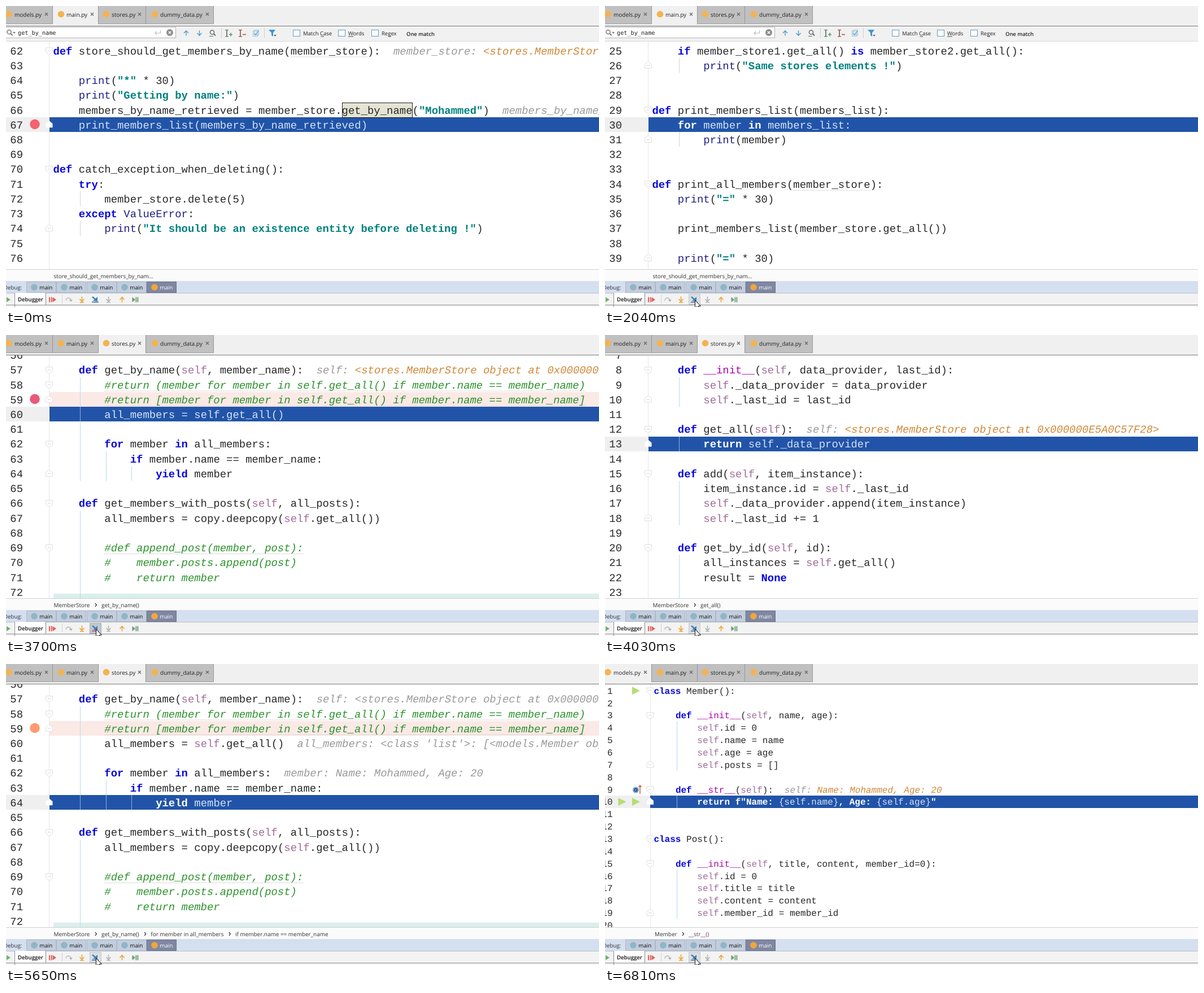
Animation, 1050 px wide and 533 px high, one loop 8000 ms. Source, as an HTML page with a canvas:

```html
<!DOCTYPE html>
<html lang="en">
<head>
<meta charset="utf-8">
<title>Debugger session</title>
<style>
html, body { margin: 0; width: 100%; height: 100%; overflow: hidden; background: #fff; }
canvas { display: block; width: 1050px; height: 533px; }
</style>
</head>
<body>
<canvas id="stage" width="1050" height="533"></canvas>
<script>
const W = 1050, H = 533, LOOP = 8000;
const ctx = document.getElementById('stage').getContext('2d');
const MONO = '"Liberation Mono", monospace', UI = '"Open Sans", sans-serif';
const BLUE = '#2154a8', INK = '#282828';

// Each view: editor geometry, first line number, source text and decorations.
const big = { cw: 11.36, rowH: 26.23, x0: 83.4, numRight: 30, foldX: 76.5, base: 19.7 };
const small = { cw: 9.62, rowH: 21.86, x0: 86.4, numRight: 13.6, foldX: 80, base: 16.4 };

const views = {
  names: { ...big, tab: 1, top: 65.9, first: 62, opens: [62, 70], closes: [67, 74],
    guides: [[4, 72, 72], [4, 74, 74]], wavy: [[62, 37, 12]], dots: [67], found: [66, 45, 11],
    src: `def store_should_get_members_by_name(member_store):

    print("*" * 30)
    print("Getting by name:")
    members_by_name_retrieved = member_store.get_by_name("Mohammed")
    print_members_list(members_by_name_retrieved)


def catch_exception_when_deleting():
    try:
        member_store.delete(5)
    except ValueError:
        print("It should be an existence entity before deleting !")

` },
  list: { ...big, tab: 1, top: 39.67, first: 24, opens: [29, 34], closes: [26, 31, 39],
    guides: [[4, 26, 26], [4, 31, 31]], wavy: [[34, 22, 12]],
    src: `          _
    if member_store1.get_all() is member_store2.get_all():
        print("Same stores elements !")


def print_members_list(members_list):
    for member in members_list:
        print(member)


def print_all_members(member_store):
    print("=" * 30)

    print_members_list(member_store.get_all())

    print("=" * 30)` },
  byName: { ...big, tab: 2, top: 22.37, first: 56, opens: [57, 58, 62, 66, 69], closes: [59, 64],
    guides: [[4, 58, 64], [4, 67, 72], [8, 63, 64], [12, 64, 64]], tint: true,
    wavy: [[58, 8, 75], [59, 8, 75], [69, 8, 31]], dots: [59], pink: 59, band: true,
    src: `
    def get_by_name(self, member_name):
        #return (member for member in self.get_all() if member.name == member_name)
        #return [member for member in self.get_all() if member.name == member_name]
        all_members = self.get_all()

        for member in all_members:
            if member.name == member_name:
                yield member

    def get_members_with_posts(self, all_posts):
        all_members = copy.deepcopy(self.get_all())

        #def append_post(member, post):
        #    member.posts.append(post)
        #    return member
` },
  getAll: { ...big, tab: 2, top: 22.37, first: 7, opens: [8, 12, 15, 20], closes: [10, 13, 18],
    guides: [[4, 9, 10], [4, 13, 13], [4, 16, 18], [4, 21, 23]], tint: true,
    src: `
    def __init__(self, data_provider, last_id):
        self._data_provider = data_provider
        self._last_id = last_id

    def get_all(self):
        return self._data_provider

    def add(self, item_instance):
        item_instance.id = self._last_id
        self._data_provider.append(item_instance)
        self._last_id += 1

    def get_by_id(self, id):
        all_instances = self.get_all()
        result = None
` },
  models: { ...small, tab: 0, top: 36.3, first: 1, opens: [1, 3, 9, 13, 15], closes: [7, 10, 19],
    guides: [[4, 4, 7], [4, 10, 10], [4, 16, 19]], tint: true,
    wavy: [[1, 12, 2], [13, 10, 2]], marks: true,
    src: `class Member():

    def __init__(self, name, age):
        self.id = 0
        self.name = name
        self.age = age
        self.posts = []

    def __str__(self):
        return f"Name: {self.name}, Age: {self.age}"


class Post():

    def __init__(self, title, content, member_id=0):
        self.id = 0
        self.title = title
        self.content = content
        self.member_id = member_id
` }
};

// Hints: text after "~" is freshly changed and shown in orange.
const OBJ = '<stores.MemberStore object at 0x000000E5A0C57F28>';
const ALL = "<class 'list'>: [<models.Member object at 0x000000E5A0C61B70>";
const GEN = '<generator object MemberStore.get_by_name at 0x000000E5A0C4>';
const PERSON = 'Name: Mohammed, Age: 20';
const START = ['store_should_get_members_by_nam...'];
const LIST = ['print_members_list()', 'for member in members_list'];
const NAME = ['MemberStore', 'get_by_name()'];
const GET = ['MemberStore', 'get_all()'];
const FOR = [...NAME, 'for member in all_members'];

// [start ms, view, current line, breadcrumbs, hints by line]
const steps = [
  [0, 'names', 67, START, { 62: 'member_store: ~' + OBJ, 66: 'members_by_name_retrieved: ' + GEN }],
  [2040, 'list', 30, START, {}],
  [2210, 'list', 30, LIST, { 29: 'members_list: ~' + GEN }],
  [3010, 'byName', 60, NAME, {}],
  [3150, 'byName', 60, NAME, { 57: 'self: ~' + OBJ }],
  [3800, 'getAll', 13, NAME, {}],
  [4030, 'getAll', 13, GET, { 12: 'self: ~' + OBJ }],
  [4400, 'byName', 62, GET, {}],
  [4650, 'byName', 62, NAME, { 57: 'self: ' + OBJ, 60: 'all_members: ~' + ALL }],
  [5030, 'byName', 63, NAME, {}],
  [5190, 'byName', 63, FOR, { 57: 'self: ' + OBJ, 60: 'all_members: ' + ALL, 62: 'member: ~' + PERSON }],
  [5480, 'byName', 64, FOR, {}],
  [5650, 'byName', 64, [...FOR, 'if member.name == member_name'],
    { 57: 'self: ' + OBJ, 60: 'all_members: ' + ALL, 62: 'member: ' + PERSON }],
  [6050, 'list', 31, LIST, {}],
  [6210, 'list', 31, LIST, { 29: 'members_list: ' + GEN, 30: 'member: ~' + PERSON }],
  [6660, 'models', 10, LIST, {}],
  [6810, 'models', 10, ['Member', '__str__()'], { 9: 'self: ~' + PERSON }]
];
const presses = [[2930, 3010], [3700, 3800], [4980, 5030], [6590, 6660]];

function rect(x, y, w, h, c) { ctx.fillStyle = c; ctx.fillRect(x, y, w, h); }
function frame(x, y, w, h, c) { ctx.strokeStyle = c; ctx.lineWidth = 1; ctx.strokeRect(x + .5, y + .5, w - 1, h - 1); }
function disc(x, y, r, c) { ctx.fillStyle = c; ctx.beginPath(); ctx.arc(x, y, r, 0, 7); ctx.fill(); }
function text(s, x, y, font, c) { ctx.font = font; ctx.fillStyle = c; ctx.fillText(s, x, y); }
function path(pts, closed) {
  ctx.beginPath();
  for (let i = 0; i < pts.length; i += 2) ctx.lineTo(pts[i], pts[i + 1]);
  if (closed) ctx.closePath();
}
function poly(pts, c) { path(pts, true); ctx.fillStyle = c; ctx.fill(); }
function line(pts, c, w = 1) { path(pts); ctx.strokeStyle = c; ctx.lineWidth = w; ctx.stroke(); }
function ui(s, x, y, size, c = '#222', weight = '') { text(s, x, y, `${weight} ${size}px ${UI}`, c); }

// Vertical arrow; dir is 1 for down, -1 for up.
function arrow(x, y, dir, c, w = 1.4) {
  line([x, y - 4.5 * dir, x, y + 4 * dir], c, w);
  line([x - 4, y, x, y + 4.3 * dir, x + 4, y], c, w);
}
function lens(x, y, c) {
  ctx.strokeStyle = c; ctx.lineWidth = 1.5;
  ctx.beginPath(); ctx.arc(x, y, 3.6, 0, 7); ctx.stroke();
  line([x + 2.6, y + 2.6, x + 6, y + 6], c, 2);
}

const TOKEN = /#.*|f?"[^"]*"|\w+|[^\w"#]+/g;
const KEYWORDS = /^(def|try|except|if|is|for|in|yield|return|class|None)$/;
function tokens(src) {
  const out = [];
  for (const m of src.matchAll(TOKEN)) {
    const s = m[0], at = m.index;
    if (s[0] === '#') out.push([s, at, 'italic', '#2c922c']);
    else if (s.includes('"')) {
      let p = at;
      for (const part of s.split(/(\{[^}]*\})/)) {
        out.push([part, p, part[0] === '{' ? '' : 'bold', '#008080']);
        p += part.length;
      }
    }
    else if (KEYWORDS.test(s)) out.push([s, at, 'bold', '#0808de']);
    else if (/^(print|ValueError)$/.test(s)) out.push([s, at, '', '#202084']);
    else if (s === 'self') out.push([s, at, '', '#a06c9a']);
    else if (/^__\w+__$/.test(s)) out.push([s, at, '', '#b200b2']);
    else if (s.trim()) out.push([s, at, '', INK]);
  }
  return out;
}
for (const v of Object.values(views)) {
  v.lines = v.src.split('\n');
  v.tokens = v.lines.map(tokens);
}

function fold(x, y, dir, active) {
  const pts = [x - 6, y - 5 * dir, x + 6, y - 5 * dir, x + 6, y + 2 * dir, x, y + 7 * dir, x - 6, y + 2 * dir];
  poly(pts, '#fff');
  if (active) return;
  path(pts, true);
  ctx.strokeStyle = '#dedede'; ctx.lineWidth = 1; ctx.stroke();
  line([x - 3, y, x + 3, y], '#d4d4d4');
}

function editor(v, current, hints, t) {
  const { cw, rowH, x0, foldX } = v, size = cw / .6;
  const clipTop = v.tab === 1 ? 62.5 : 36;
  const top = n => v.top + (n - v.first) * rowH;
  const col = c => x0 + c * cw;
  const font = style => `${style} ${size}px ${MONO}`;
  const edge = Math.round(foldX), rowPx = Math.round(rowH);
  const bar = (n, x, w, c) => rect(x, Math.round(top(n)), w, rowPx, c);
  ctx.save();
  ctx.beginPath(); ctx.rect(0, clipTop, W, 466 - clipTop); ctx.clip();
  rect(0, 0, W, 466, '#fff');
  if (v.pink) bar(v.pink, edge, W, '#fbe9e6');
  if (v.band) rect(84, 458, W, 9, '#daefec');
  rect(Math.floor(foldX), 0, 1, 466, '#e6e6e6');
  bar(current, 0, edge, '#efefef');
  bar(current, edge, W, BLUE);

  for (const [c, a, b] of v.guides) {
    const x = Math.round(col(c) + 2.4);
    rect(x, top(a), 1, (b - a + 1) * rowH, v.tint ? '#b4dcee' : '#cfd4d6');
    if (current >= a && current <= b) bar(current, x, 1, '#8fb0dc');
  }
  if (v.found) {
    const [n, c, len] = v.found;
    const box = [Math.round(col(c)), Math.round(top(n)), Math.round(len * cw), rowPx + 1];
    rect(...box, '#e4e4d4');
    frame(...box, '#222');
  }
  ctx.setLineDash([2, 1]);
  for (const [n, c, len] of v.wavy || []) {
    const y = top(n) + rowH - 2;
    line([col(c), y, col(c + len), y], '#c9cec6');
  }
  ctx.setLineDash([]);

  v.lines.forEach((src, i) => {
    const n = v.first + i, y = top(n) + v.base, lit = n === current;
    text(n, v.numRight - String(n).length * cw, y, font(''), INK);
    for (const [s, c, style, color] of v.tokens[i])
      text(s, col(c), y, font(style), lit ? (style === 'bold' ? '#fff' : '#d5e2f5') : color);
    if (hints[n]) {
      const [old, fresh = ''] = hints[n].split('~');
      const x = col(src.length + 2) + .5;
      text(old, x, y, font('italic'), '#999');
      text(fresh, x + old.length * cw, y, font('italic'), '#cf8837');
    }
  });

  const mid = n => top(n) + rowH / 2;
  for (const n of v.opens) fold(foldX, mid(n), 1, n === current);
  for (const n of v.closes) fold(foldX, mid(n), -1, n === current);
  for (const n of v.dots || [])
    disc(51, mid(n) - .8, 8.8, v.tab === 1 ? '#f5626f' : t < 3800 ? '#e85a78' : '#fd9b71');
  if (v.marks) {
    for (const [x, n] of [[48, 1], [48, 10], [23.5, 10]])
      poly([x, mid(n) - 7, x + 14, mid(n), x, mid(n) + 7], '#b5dd72');
    disc(54.5, 223, 5.5, '#6fa9d6');
    ctx.strokeStyle = '#234'; ctx.lineWidth = 1.2;
    ctx.beginPath(); ctx.arc(54.5, 223, 2.3, 0, 7); ctx.stroke();
    line([62, 230, 62, 215], '#c8573c', 1.4);
    line([59.5, 218, 62, 215, 64.5, 218], '#c8573c', 1.4);
  }
  ctx.restore();
}

function tabs(active) {
  rect(0, 0, W, 36, '#f0f0f0');
  const items = [['models.py', 0, 83, 15], ['main.py', 83, 164, 107], ['stores.py', 164, 248, 187], ['dummy_data.py', 248, 368, 273]];
  items.forEach(([name, l, r, x], i) => {
    rect(l, 0, r - l, 32, i === active ? '#f0f0f0' : '#c0c0c0');
    rect(r - 1, 0, 1, 32, '#959595');
    if (i !== active) rect(l, 31, r - l, 1, '#a0a0a0');
    disc(i ? x - 9.5 : 5, 14.5, 5.8, '#f4b350');
    ui(name, x, 18.5, 10);
    line([r - 14, 12, r - 9, 17], '#666', 1.3);
    line([r - 9, 12, r - 14, 17], '#666', 1.3);
  });
  rect(0, 35, W, 1, '#777');
}

function findBar() {
  rect(0, 36, W, 27, '#f1f1f1');
  rect(0, 38, 301, 19, '#fff');
  frame(-1, 37, 302, 20, '#b4b4b4');
  lens(5.5, 46, '#777');
  poly([12, 46, 17, 46, 14.5, 49], '#777');
  text('get_by_name', 21, 51, '10.2px "DejaVu Sans Mono", monospace', '#222');
  line([273.5, 43, 273.5, 48, 264, 48], '#bbb', 1.2);
  line([267, 45, 264, 48, 267, 51], '#bbb', 1.2);
  disc(290, 47, 6, '#8c8c8c');
  line([287.8, 44.8, 292.2, 49.2], '#fff', 1.4);
  line([292.2, 44.8, 287.8, 49.2], '#fff', 1.4);
  arrow(319, 48, -1, '#4a9bd0');
  arrow(342.5, 48, 1, '#4a9bd0');
  lens(365, 46.5, '#667');
  line([360, 53.5, 367, 53.5], '#5aa55a', 1.4);
  rect(381, 39, 1, 18, '#cfcfcf');
  for (const [x, c, plus] of [[391, '#58a05a', 1], [415, '#cc4a40', 0]]) {
    line([x, 43, x, 54], '#555', 1.5);
    line([x - 3, 42.5, x + 3, 42.5], c, 1.4);
    line([x - 3, 54, x + 3, 54], c, 1.4);
    line([x + 4, 50.5, x + 10, 50.5], c, 1.6);
    if (plus) line([x + 7, 47.5, x + 7, 53.5], c, 1.6);
  }
  frame(437, 44, 9, 10, '#9cc7e0');
  frame(439, 42, 9, 10, '#9cc7e0');
  line([439, 48, 442, 51, 447, 44], '#68aed2', 1.5);
  rect(457, 39, 1, 18, '#cfcfcf');
  poly([465, 42, 477, 42, 473, 47.5, 473, 54, 470, 52, 470, 47.5], '#3c97d3');
  poly([474, 51, 479, 51, 476.5, 54], '#666');
  for (const [s, x, k, w] of [['Match Case', 508, 31.5, 5.5], ['Words', 588, 0, 9], ['Regex', 647, 12, 5]]) {
    rect(x, 42, 13, 12, '#fff');
    frame(x, 42, 13, 12, '#5b9fc4');
    ui(s, x + 18, 52, 9.5);
    rect(x + 18 + k, 53.5, w, 1, '#444');
  }
  ui('One match', 709, 53, 9.4, '#222', '600');
  rect(0, 62, W, 1, '#d8d8d8');
}

function crumbs(parts, x) {
  rect(0, 466, W, 22, '#fbfbfb');
  rect(0, 466, W, 1, '#d0d0d0');
  parts.forEach((s, i) => {
    if (i) {
      line([x + 9.5, 475, x + 12, 478, x + 9.5, 481], '#333', 1.2);
      x += 20.6;
    }
    ui(s, x, 481.5, 9.95, s.startsWith('__') ? '#6b3a68' : '#333');
    x += ctx.measureText(s).width;
  });
}

function debugBar(hover, pressed) {
  rect(0, 487, W, 21, '#d4dff0');
  ui('Debug:', -4, 501.5, 9.7, '#333');
  for (let i = 0; i < 5; i++) {
    const x = 36 + Math.round(i * 53.3), on = i === 4;
    rect(x, 488, 53, 20, on ? '#7f87a2' : '#c2cddd');
    frame(x, 488, 53, 20, on ? '#6b7289' : '#adb8c8');
    disc(x + 14, 498, 5.8, on ? '#f0a63c' : '#8fb5c6');
    ui('main', x + 23.3, 501.5, 9.8, on ? '#fff' : '#111');
  }
  rect(0, 508, W, 25, '#f3f3f3');
  rect(0, 508, W, 1, '#b9c0ca');
  rect(0, 529, W, 1, '#8e8e8e');
  rect(15, 508, 56, 21, '#fff');
  rect(15, 508, 1, 25, '#8e8e8e');
  rect(70, 508, 1, 21, '#8e8e8e');
  poly([1, 515.5, 8, 520, 1, 524.5], '#6bb36b');
  ui('Debugger', 21, 523, 9.6, '#111', '600');

  rect(76, 515.5, 2, 9, '#e2605c');
  rect(79.5, 515.5, 2, 9, '#e2605c');
  poly([82.5, 515.5, 89, 520, 82.5, 524.5], '#e2605c');
  rect(99, 511, 1, 16, '#d2d2d2');
  ctx.strokeStyle = '#b4b4b4'; ctx.lineWidth = 1.5;
  ctx.beginPath(); ctx.arc(110.5, 521.5, 4.5, Math.PI, 0); ctx.stroke();
  poly([111.5, 520, 118, 520, 115, 524], '#b4b4b4');
  arrow(134.5, 519, 1, '#eda431', 1.6);
  rect(131, 524, 7, 1.5, '#eda431');
  if (hover) {
    rect(148, 510, 21, 19, pressed ? '#c3c6cb' : '#dcdee1');
    frame(148, 510, 21, 19, pressed ? '#a8abb0' : '#c6c8cb');
  }
  line([153, 515, 160, 521], '#3a82bd', 2.4);
  poly([162, 515, 162, 523, 154, 522], '#3a82bd');
  rect(152, 523.5, 12, 1.6, pressed ? '#c0507c' : '#4a6f96');
  arrow(181.5, 519, 1, '#b0b0b0', 1.5);
  rect(178, 524, 7, 1.3, '#b0b0b0');
  arrow(205.5, 520, -1, '#eda431', 1.6);
  poly([223.5, 515.5, 229, 520, 223.5, 524.5], '#6a9c72');
  rect(229.5, 515.5, 1.8, 9, '#6a9c72');
  rect(232.5, 515.5, 1.8, 9, '#6a9c72');
}

function pointer(t) {
  let x, y;
  if (t >= 210 && t < 560) {
    const k = Math.floor((t - 210) / 70);
    x = 726 - k * 102.5;
    y = 498 + 7 * (k - 2) ** 2;
  } else if (t >= 800) {
    x = 159.5;
    y = t < 885 ? 527 : t < 970 ? 523 : 521;
  } else return;
  const pts = [0, 0, 0, 14, 3.2, 11, 5.6, 16.5, 7.8, 15.5, 5.4, 10.3, 9.8, 10.3];
  const moved = pts.map((p, i) => p + (i % 2 ? y : x));
  poly(moved, '#fff');
  path(moved, true);
  ctx.strokeStyle = '#111'; ctx.lineWidth = 1; ctx.stroke();
}

function draw(t) {
  const [, name, current, trail, hints] = steps.findLast(s => s[0] <= t);
  const v = views[name];
  ctx.textRendering = 'geometricPrecision';
  editor(v, current, hints, t);
  tabs(v.tab);
  if (v.tab === 1) findBar();
  crumbs(trail, trail[0] === 'Member' ? 88 : 84.5);
  debugBar(t >= 885, presses.some(([a, b]) => t >= a && t < b));
  pointer(t);
}

const began = performance.now();
function tick() {
  draw((performance.now() - began) % LOOP);
  requestAnimationFrame(tick);
}
tick();
</script>
</body>
</html>
```
